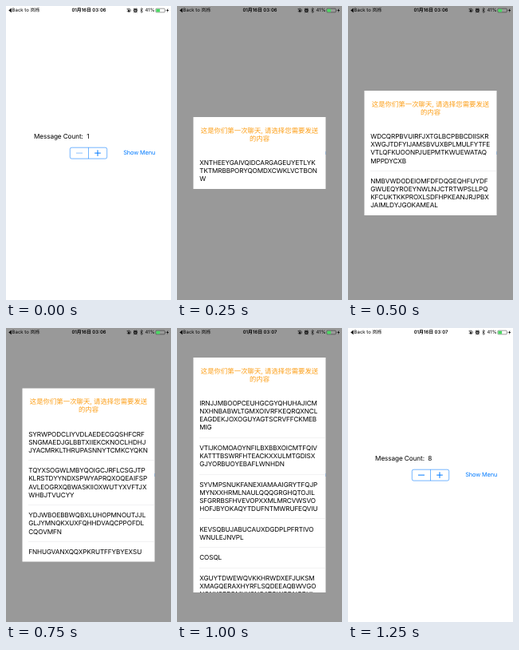
Write an HTML page that moves like this. It is 207x368 px and loops after 1500 ms.

```html
<!DOCTYPE html>
<html lang="zh-CN">
<head>
<meta charset="utf-8">
<title>Message menu</title>
<style>
  html, body { margin: 0; width: 100%; height: 100%; overflow: hidden; background: #fff; }

  /* Laid out in points, shown at half size. */
  .screen {
    position: absolute;
    left: 0;
    top: 0;
    width: 414px;
    height: 736px;
    overflow: hidden;
    transform: scale(.5);
    transform-origin: 0 0;
    color: #000;
    font: 16.4px/20.3px Inter, "Noto Sans CJK SC", "Noto Sans CJK", sans-serif;
    letter-spacing: -.2px;
    text-rendering: geometricPrecision;
    white-space: nowrap;
  }
  .at { position: absolute; transform: translate(-50%, -50%); white-space: pre; }
  svg { position: absolute; left: 0; top: 0; width: 414px; height: 736px; fill: none; }

  .early, .late, .dim, .panel { animation: 1.5s step-end infinite; }
  .early { animation-name: early; }
  .late { animation-name: late; }
  .dim { animation-name: menu; }
  .panel { animation-name: slot; animation-delay: calc(var(--slot) * 250ms - 1500ms); }

  @keyframes early { 0% { visibility: visible } 66.6666%, 100% { visibility: hidden } }
  @keyframes late { 0% { visibility: hidden } 66.6666%, 100% { visibility: visible } }
  @keyframes menu {
    0% { visibility: hidden }
    16.6666% { visibility: visible }
    83.3333%, 100% { visibility: hidden }
  }
  @keyframes slot { 0% { visibility: visible } 16.6666%, 100% { visibility: hidden } }

  .count { left: 139.4px; top: 327px; }
  .button { left: 334.4px; top: 368.4px; color: #007aff; font-size: 14.7px; }

  .dim { position: absolute; inset: 0; background: rgba(0, 0, 0, .4); }
  .layer { position: absolute; inset: 0; display: grid; align-items: center; }
  .panel {
    grid-area: 1 / 1;
    box-sizing: border-box;
    width: 331.2px;
    max-height: 588.8px;
    margin-left: 41.4px;
    overflow: hidden;
    background: #fff;
  }
  h1 {
    margin: 0;
    padding: 24px 0 23.9px;
    color: #fc9d14;
    font-size: 16.8px;
    font-weight: 400;
    letter-spacing: 0;
    text-align: center;
  }
  .panel p { position: relative; margin: 0; padding: 15.35px 0 15.35px 15px; }
  .panel p + p::before {
    content: "";
    position: absolute;
    left: 15px;
    right: 0;
    top: 0;
    height: 1px;
    background: #e4e4e6;
  }

  .status { font-size: 12px; letter-spacing: 0; }
  .status .at { top: 11.2px; }
  .status .back { left: 15.2px; transform: translateY(-50%); }
  .status .clock { left: 208px; font-size: 11.8px; font-weight: 600; }
  .status .charge { left: 361px; font-size: 11.8px; }
</style>
</head>
<body>
<div class="screen">
  <div class="at count early">Message Count:  1</div>
  <div class="at count late">Message Count:  8</div>
  <div class="at button">Show Menu</div>

  <svg viewBox="0 0 207 368" stroke="#007aff">
    <rect x="80.3" y="177.2" width="46.4" height="13.9" rx="2" stroke-width=".55"/>
    <path d="M103.5 177.2v13.9" stroke-width=".55"/>
    <path d="M111.2 184.1h7.6M115 180.3v7.6" stroke-width="1"/>
    <path class="early" d="M88 184.1h8" stroke-opacity=".45"/>
    <path class="late" d="M88 184.1h8"/>
  </svg>

  <div class="dim"></div>
  <div class="layer" id="layer"></div>

  <div class="status">
    <span class="at back">Back to 岚栎</span>
    <span class="at clock early">01月16日 03:06</span>
    <span class="at clock late">01月16日 03:07</span>
    <span class="at charge">41%</span>
  </div>
  <svg viewBox="0 0 207 368" stroke="#000" stroke-width=".5">
    <path d="M3.3 5.4l3.6-2.8v5.6z" fill="#000" stroke="none"/>
    <!-- rotation lock -->
    <path d="M152.3 4.1a2.3 2.3 0 1 1-.4 1.9M153.3 5.2v-.5a.8.8 0 0 1 1.6 0v.5"/>
    <path d="M151.4 3.4l1.6.2-.9 1.2zM152.9 5.2h2.4v1.7h-2.4z" fill="#000" stroke="none"/>
    <!-- alarm -->
    <circle cx="162.4" cy="5.7" r="1.8" stroke-width="1.2"/>
    <path d="M162.4 4.4v1.5h1M160.1 4l1.2-1.1M164.7 4l-1.2-1.1M161.2 7.5l-.6.8M163.6 7.5l.6.8" stroke-width=".8"/>
    <!-- bluetooth -->
    <path d="M168.5 4l3 2.9-1.5 1.6V2.4l1.5 1.6-3 2.9" stroke-width=".6"/>
    <!-- battery -->
    <rect x="187.9" y="3.2" width="11.4" height="4.7" rx=".9" stroke-width=".4"/>
    <rect x="188.4" y="3.7" width="4.7" height="3.7" rx=".3" fill="#4cd964" stroke="none"/>
    <path d="M199.9 4.7q.9.8 0 1.7z" fill="#000" stroke="none"/>
    <path d="M203.4 2.8l-2.2 3.1h1.4l-.7 2.4 2.3-3.2h-1.4z" fill="#000" stroke="none"/>
  </svg>
</div>

<script>
  // One menu per slot; "|" breaks a line inside a message.
  const menus = [
    ["XNTHEEYGAIVQIDCARGAGEUYETLYK|TKTMRBBPORYQOMDXCWKLVCTBON|W"],
    [
      "WDCQRPBVUIRFJXTGLBCPBBCDIISKR|XWGJTDFYIJAMSBVUXBPLMULFYTFE|VTLQFKUOONPJUEPMTKWUEWATAQ|MPPDYCXB",
      "NMBVWDODEIOMFDFDQGEQHFUYDF|GWUEQYROEYNWLNJCTRTWPSLLPQ|KFCUKTKKPROXLSDFHPKEANJRJPBX|JAIMLDYJGOKAMEAL"
    ],
    [
      "SYRWPODCLIYVDLAEDECGQSHFCRF|SNGMAEDJGLBBTXIIEKCKNOCLHDHJ|JYACMRKLTHRUPASNNYTCMKCYQKN",
      "TQYXSOGWLMBYQOIGCJRFLCSGJTP|KLRSTDYYNDXSPWYAPRQXOQEAIFSP|AVLEOGRXQBWASKIIOXWUTYXVFTJX|WHBJTVUCYY",
      "YDJWBOEBBWQBXLUHOPMNOUTJJL|GLJYMNQKXUXFQHHDVAQCPPOFDL|CQOVMFN",
      "FNHUGVANXQQXPKRUTFFYBYEXSU"
    ],
    [
      "IRNJJMBOOPCEUHGCGYQHUHAJICM|NXHNBABWLTGMXOIVRFKEQRQXNCL|EAGDEKJOXOGUYAGTSCRVFFCKMEB|MIG",
      "VTIJKOMOAOYNFILBXBBXOICMTFQIV|KATTTBSWRFHTEACKXXULMTGDISX|GJYORBUOYEBAFLWNHDN",
      "SYVMPSNUKFANEXIAMAAIGRYTFQJP|MYNXXHRMLNAULQQQGRGHQTOJIL|SFGRRBSFHVEVOPXXMLMRCVWSVO|HOFJBYOKAQYTDUFNTMWRUFEQVIU",
      "KEVSQBUJABUCAUXDGDPLPFRTIVO|WNULEJNVPL",
      "COSQL",
      "XGUYTDWEWQVKKHRWDXEFJUKSM|XMAGQERAXHYRFLSQDEEAQBWVGO|NONKSREOMUKSNQATOWGDNGRUI"
    ]
  ];
  const title = "<h1>这是你们第一次聊天, 请选择您需要发送<br>的内容</h1>";
  const cell = text => `<p>${text.replaceAll("|", "<br>")}</p>`;

  document.getElementById("layer").innerHTML = menus.map((cells, i) =>
    `<div class="panel" style="--slot:${i + 1}">${title}${cells.map(cell).join("")}</div>`
  ).join("");
</script>
</body>
</html>
```
